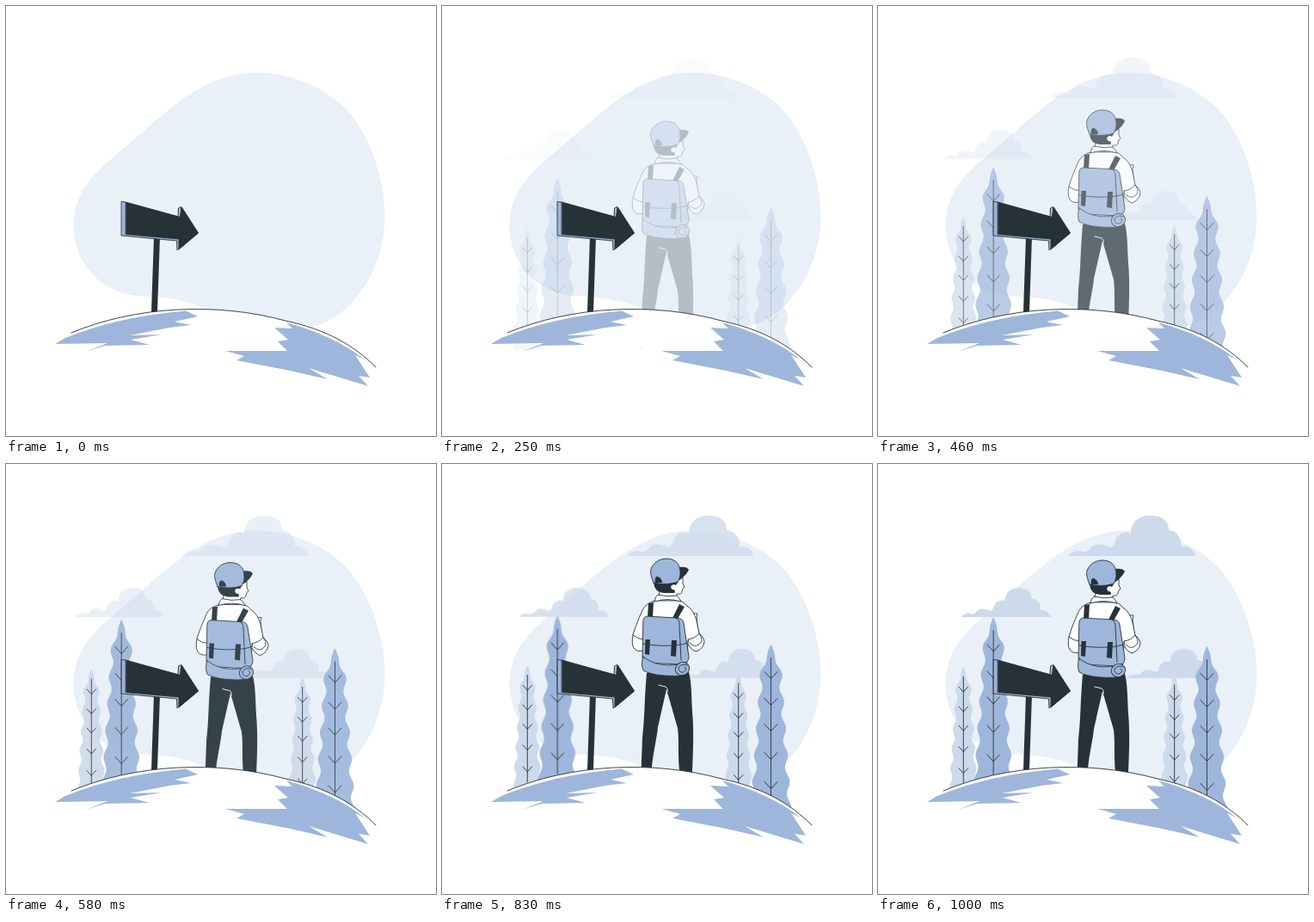
Animation of 500x500 px, one loop 1.04 s. Source, as an HTML page:

```html
<!DOCTYPE html>
<html lang="en">
<head>
<meta charset="utf-8">
<title>Hiker at a signpost</title>
<style>
  html, body { margin: 0; width: 100%; height: 100%; overflow: hidden; background: #fff; }
  svg { display: block; width: 100%; height: 100%; }
  .dark { fill: #263238; }
  .blue { fill: #9eb6db; }
  .pale { fill: #cddaeb; }
  .white { fill: #fff; }
  .line { fill: none; }
  .ink { stroke: #263238; stroke-width: .9; stroke-linejoin: round; stroke-linecap: round; }
  .flat { stroke: none; }
</style>
</head>
<body>
<svg viewBox="0 0 500 500">
  <defs>
    <path id="cloud" d="M0 0C3-5 8-6 13-6C18-4 23-5 26-10C30-15 39-14 45-11C51-9 52-12 54-18C57-26 65-29 72-26C72-39 80-47 94-47C109-47 116-41 116-30C126-29 132-21 130-11C139-12 146-7 147 0Z"/>
  </defs>

  <path fill="#e9f0f8" stroke="#dfe6ee" stroke-width=".5" d="M291 78C329 78 366 93 392 117C420 144 440 198 440 245C440 300 408 358 358 372L235 353C215 343 190 338 160 337C112 336 79 300 79 255C79 216 105 193 125 176C161 146 177 129 209 106C236 88 262 78 291 78Z"/>

  <g id="clouds" class="pale">
    <use href="#cloud" transform="translate(222 107)"/>
    <use href="#cloud" transform="translate(97 178) scale(.705 .72)"/>
    <use href="#cloud" transform="translate(289 249) scale(.705 .72)"/>
  </g>

  <g id="trees"></g>

  <g id="man" class="ink">
    <!-- legs -->
    <path class="dark flat" d="M238 245C235 280 236 295 233 320L231 376L245 372L244 354C246 335 250 320 251 308L261 264L274 309C276 325 274 340 276 358V372H291V358C292 340 293 310 291 290C290 270 290 255 287 244Z"/>
    <path class="line" style="stroke:#fff" d="M252 259L260 261Q263 263 262 267"/>
    <!-- arms and shirt -->
    <path class="white" d="M222 201Q220 211 223 216Q227 221 234 219L238 204Z"/>
    <path class="white" d="M291 178Q292 175 297 176L296 181L298 198Q305 204 305 209Q304 216 296 220Q290 219 286 211Z"/>
    <path class="white" d="M247 161Q237 164 233 172C228 184 224 193 222 201Q228 206 236 206V232H285L286 206Q294 205 299 199L296 184Q293 172 285 167Q281 162 277 161Z"/>
    <path class="line" d="M299 199Q303 204 302 208Q296 218 288 210"/>
    <!-- neck and head -->
    <path class="white" d="M253 150L252 158H272L273 153Q279 154 279 150L280 147L282 145L280 141L280 134L266 137Z"/>
    <path class="dark flat" d="M246 140Q247 151 258 152H270Q272 151 270 148Q266 148 267 144Q269 141 272 143L275 138Z"/>
    <path class="white flat" d="M267 143Q272 141 273 145Q272 149 268 148Q265 146 267 143Z"/>
    <path class="blue" d="M246 140C243 133 242 127 243 124C247 114 256 112 261 112C270 112 275 117 276 122C278 128 277 134 274 139C266 142 255 142 246 140Z"/>
    <path class="dark flat" d="M276 122C281 121 286 122 287 125C284 131 280 134 275 138C278 132 277 127 276 122ZM248 140C247 135 249 132 251 133C254 134 256 137 256 140Z"/>
    <path class="white" d="M247 162Q248 156 251 154Q262 157 273 155Q276 158 278 162Q262 157 247 162Z"/>
    <!-- straps and backpack -->
    <path class="dark flat" d="M240 164L246 163L245 181H239ZM276 165L282 168L274 182L268 181Z"/>
    <path class="blue" d="M234 183Q235 179 239 179L273 181Q280 181 281 187L287 226Q287 234 278 235L238 233Q233 232 233 226Z"/>
    <path class="line" d="M272 181Q276 182 276 189L278 230M234 211Q255 215 278 212L285 210"/>
    <path class="dark flat" d="M236.500 206L242 206L241 224L236 223ZM267 207L273 207L272 226L266 225Z"/>
    <path class="blue" d="M234 226Q231 234 234 242C245 248 262 249 279 248L284 233C262 239 245 235 234 226Z"/>
    <ellipse class="blue" cx="279.500" cy="240" rx="8.300" ry="7.500" transform="rotate(-25 279.500 240)"/>
    <path class="line" d="M285 236Q278 233 275 239Q275 245 281 244Q286 240 282 238"/>
  </g>

  <!-- hill -->
  <path class="white" d="M76 380C150 349 245 344 325 366C372 376 404 394 430 420L421 438L268 410L233 397.500L57 393Z"/>
  <path class="blue" d="M57 393L69 386Q130 361 209 354.500L223 361L196 367L215 371L190 374L144 383L181 382L145 388L167 394L115 395L93 402L118 392Z"/>
  <path class="blue" d="M326 368Q381 383 417 411L406 406L423 432L410 430L421 442L352 421L374 434L330 424L268 412L277 407L255 401L327 401L316 390L328 388L312 374L333 375Z"/>
  <path class="line ink" d="M76 380C150 349 245 344 325 366C372 376 404 394 430 420"/>

  <!-- signpost -->
  <path class="dark" d="M172 268H179L176 355L169 356Z"/>
  <path class="blue ink" d="M134.500 227.500L139 228L200 245L200.500 235L204 233.500L223.500 264L199 284L198.500 273L134.500 267Z"/>
  <path class="dark ink" d="M139.500 228.500L202.500 245.500L204 234L223.500 264L201 283L201 271L139.500 265.500Z"/>
</svg>
<script>
const byId = id => document.getElementById(id);
const LENGTH = 192;

// Half the width of a tree at distance d below its tip
function halfWidth(d) {
  const wave = Math.cos((d - 20) * 2 * Math.PI / 31);
  return Math.min(.35 * d, 8.5 + .07 * d) - Math.min(2.2, .08 * d) * wave;
}

function treeMarkup(x, tip, tone, sx, sy) {
  const left = [], right = [];
  for (let d = 0; d <= LENGTH; d += 2) {
    const w = halfWidth(d).toFixed(2);
    right.push(`${w} ${d}`);
    left.unshift(`${-w} ${d}`);
  }
  const twigs = [40, 71, 101, 134, 168].map(d => `M-7.5 ${d - 8}L0 ${d}L7.5 ${d - 8}`).join('');
  return `<g class="tree"><g transform="translate(${x} ${tip}) scale(${sx} ${sy})">
    <path class="${tone}" d="M${right.concat(left).join('L')}Z"/>
    <path class="line ink" vector-effect="non-scaling-stroke" d="M0 16V184${twigs}"/></g></g>`;
}

byId('trees').innerHTML =
  treeMarkup(99.3, 235.5, 'pale', .7, .74) +
  treeMarkup(134.2, 178, 'blue', .95, 1) +
  treeMarkup(344.7, 245, 'pale', .7, .74) +
  treeMarkup(382.5, 211.5, 'blue', 1, 1);

// CSS-style cubic Bézier easing, solved by bisection
function bezier(x1, y1, x2, y2) {
  const at = (a, b, s) => 3 * a * s * (1 - s) ** 2 + 3 * b * s * s * (1 - s) + s ** 3;
  return t => {
    let lo = 0, hi = 1;
    for (let i = 0; i < 24; i++) {
      const mid = (lo + hi) / 2;
      if (at(x1, x2, mid) < t) lo = mid; else hi = mid;
    }
    return at(y1, y2, hi);
  };
}

const bounce = bezier(.36, -.01, .5, 1.38);
const easeIn = bezier(.42, 0, 1, 1);
const risers = [byId('man'), ...document.querySelectorAll('.tree')];

function place(el, x, y, opacity) {
  el.setAttribute('transform', `translate(${x} ${y})`);
  el.setAttribute('opacity', Math.max(0, Math.min(1, opacity)));
}

// The motion advances in 24 steps per second
function draw(now) {
  const step = Math.min(24, Math.floor((now % 1040 + 5) * .024));
  const t = step < 2 ? 0 : Math.min(1, step / 24 + .02);
  const up = bounce(t), across = easeIn(t);
  risers.forEach(el => place(el, 0, 30 * (1 - up), up));
  place(byId('clouds'), -30 * (1 - across), 0, across);
}

const start = performance.now();
function tick() {
  draw(performance.now() - start);
  requestAnimationFrame(tick);
}
tick();
</script>
</body>
</html>
```
